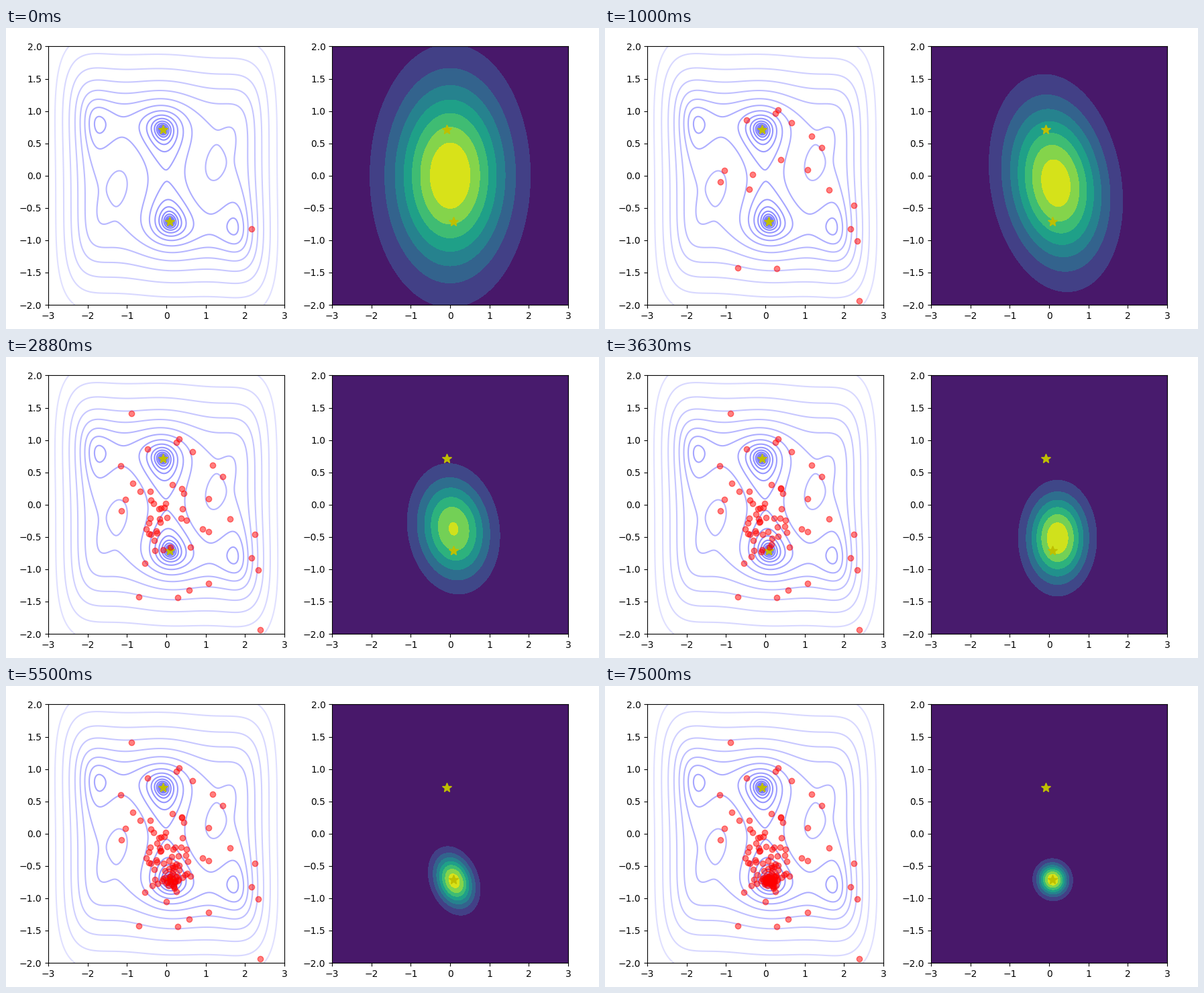
Recreate the animation shown at these times as a matplotlib script. Size 884 by 448 pixels, loop 7620 ms.

```python
import matplotlib.pyplot as plt
import numpy as np
from matplotlib.animation import FuncAnimation

W, H, DPI = 884, 448, 100
LOOP_MS, STEPS = 7620, 61
GENERATION = 2  # steps between updates of the search distribution
RATE = 2.3      # samples drawn per step
MINIMUM = np.array([0.0898, -0.7126])

# Key poses of the search: step, mean x, mean y, std x, std y, correlation
SEARCH = np.array([
    (0, 0, 0, 1, 1, 0),
    (8, 0.17, -0.115, 0.84, 0.833, -0.17),
    (16, -0.04, -0.23, 0.728, 0.605, -0.216),
    (28, 0.213, -0.518, 0.507, 0.457, 0),
    (36, 0.094, -0.735, 0.343, 0.349, -0.185),
    (50, 0.11, -0.728, 0.316, 0.2, -0.3),
    (60, 0.093, -0.713, 0.249, 0.16, -0.03),
])

# Far samples that open the search
OPENING = [
    (2.16, -0.82), (0.67, 0.82), (-0.70, -1.43), (1.17, 0.61),
    (0.28, -1.44), (-0.48, 0.86), (2.38, -1.94), (1.07, 0.09),
    (0.25, 0.96), (2.33, -1.01), (1.62, -0.22), (2.24, -0.46)]


def search_at(step):
    return [np.interp(step, SEARCH[:, 0], col) for col in SEARCH[:, 1:].T]


def make_samples():
    """Draw each sample around the mean of its step, ever more tightly."""
    rng = np.random.default_rng(4)
    points = list(OPENING)
    for k in range(len(OPENING), int(RATE * STEPS) + 2):
        mx, my, sx, sy, _ = search_at(k / RATE)
        points.append(rng.normal((mx, my), (sx**2, sy**2)))
    return np.array(points)


def camel(x, y):
    return (4 - 2.1 * x**2 + x**4 / 3) * x**2 + x * y + (4 * y**2 - 4) * y**2


def density(step):
    mx, my, sx, sy, rho = search_at(step)
    u, v = (X - mx) / sx, (Y - my) / sy
    k = 1 - rho**2
    peak = 1 / (2 * np.pi * sx * sy * np.sqrt(k))
    return peak * np.exp(-(u**2 - 2 * rho * u * v + v**2) / (2 * k))


def make_axes(fig, left):
    ax = fig.add_axes([left / W, 36 / H, 352 / W, 384.5 / H])
    ax.set(xlim=(-3, 3), ylim=(-2, 2))
    ax.plot(*np.array([MINIMUM, -MINIMUM]).T, "y*", ms=10, zorder=3)
    return ax


X, Y = np.meshgrid(np.linspace(-3, 3, 241), np.linspace(-2, 2, 241))
samples = make_samples()

fig = plt.figure(figsize=(W / DPI, H / DPI), dpi=DPI, facecolor="white")
left_ax, right_ax = make_axes(fig, 63.1), make_axes(fig, 486.1)

levels = np.arange(-7, 8) * 0.6
fade = np.linspace(0.42, 0.88, len(levels))
fx, fy = np.meshgrid(np.linspace(-3, 3, 500), np.linspace(-2, 2, 500))
left_ax.contour(fx, fy, np.log(camel(fx, fy) + 1.0317), levels=levels,
                colors=[(c, c, 1) for c in fade], linewidths=1.5)
dots, = left_ax.plot([], [], "ro", ms=6, alpha=0.5, zorder=4)
filled = []


def update(step):
    dots.set_data(*samples[:1 + int(RATE * step)].T)
    while filled:
        filled.pop().remove()
    z = density(step - step % GENERATION)
    filled.append(right_ax.contourf(X, Y, z, cmap="viridis", zorder=1))
    return dots,


anim = FuncAnimation(fig, update, frames=STEPS, interval=LOOP_MS / STEPS,
                     repeat=True, repeat_delay=0)
plt.show()
```
